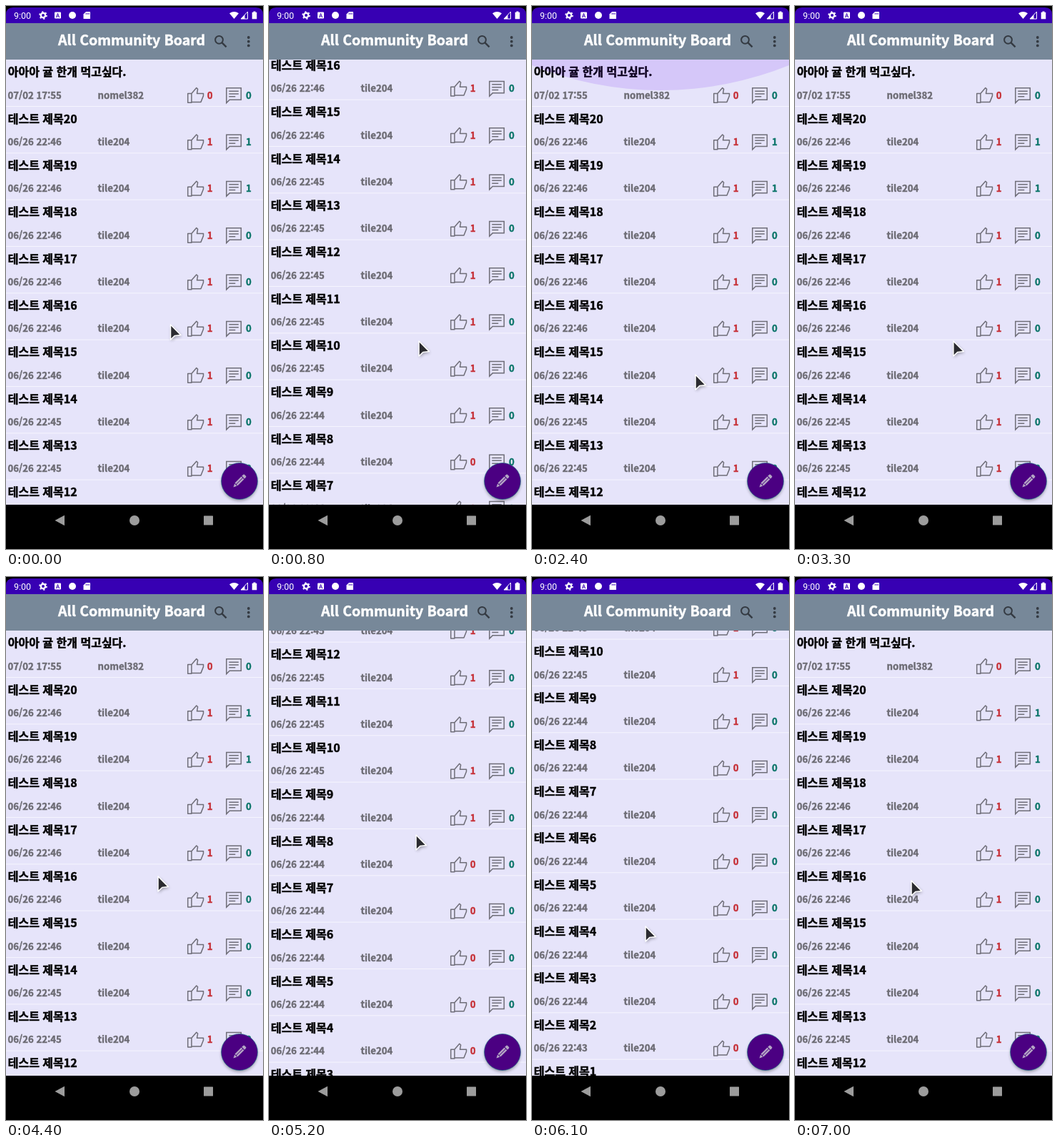
Write an HTML page that moves like this. It is 360x760 px and loops after 7100 ms.

```html
<!DOCTYPE html>
<html lang="ko">
<head>
<meta charset="utf-8">
<title>Community board</title>
<style>
  html, body { margin: 0; width: 100%; height: 100%; overflow: hidden; background: #000; }
  svg { display: block; }
  text { font-family: "Noto Sans CJK KR", "Noto Sans CJK", "Noto Sans", sans-serif; font-weight: 700; }
  .head { font-size: 19.5px; fill: #fff; stroke: #fff; stroke-width: .5; }
  .title { font-size: 16px; font-weight: 900; fill: #000; stroke: #000; stroke-width: .45; }
  .meta, .like, .reply { font-size: 13.2px; stroke-width: .4; }
  .meta { fill: #6c6b73; stroke: #6c6b73; }
  .like { fill: #c62f36; stroke: #c62f36; }
  .reply { fill: #0a7468; stroke: #0a7468; }
  .clock { font: 400 12.5px Roboto, sans-serif; fill: #fff; }
</style>
</head>
<body>
<svg width="360" height="760" viewBox="0 0 360 760">
  <defs>
    <clipPath id="view"><rect y="75" width="360" height="623"/></clipPath>
    <filter id="soft" x="-50%" y="-50%" width="200%" height="200%"><feGaussianBlur stdDeviation="2.2"/></filter>
    <g id="icons" fill="none" stroke="#6f6e78" stroke-width="1.5" stroke-linejoin="round">
      <path d="M254.7 47.5h5.2v12.8h-5.2zM259.9 47.5 266.8 39.6 268.6 41.4 267.5 47.5H276.5V50.6L273 59.4H259.9"/>
      <path d="M308.8 39.8H329.3V56.2H313.2L308.8 60.6zM312.3 44.2H325.8M312.3 48H325.8M312.3 51.8H321.3" stroke-linejoin="miter"/>
    </g>
  </defs>

  <rect width="360" height="760"/>
  <rect y="75" width="360" height="623" fill="#e6e4fa"/>
  <g clip-path="url(#view)">
    <g id="list"></g>
    <circle id="topGlow" cx="180" r="480" fill="#6200ee"/>
    <circle id="endGlow" cx="180" r="480" fill="#6200ee"/>
  </g>

  <path d="M0 24V12Q0 2 10 2H350Q360 2 360 12V24z" fill="#3700b3"/>
  <g fill="#fff">
    <text class="clock" x="11" y="17.5">9:00</text>
    <circle cx="52" cy="13" r="3.2" fill="none" stroke="#fff" stroke-width="2.4"/>
    <circle cx="52" cy="13" r="5" fill="none" stroke="#fff" stroke-width="1.6" stroke-dasharray="2.2 3.04"/>
    <rect x="68" y="8.5" width="9" height="9" rx="1"/>
    <path d="M70.4 16 72.5 10.4 74.6 16M71.2 14.2h2.6" fill="none" stroke="#3700b3"/>
    <circle cx="93" cy="13" r="5"/>
    <path d="M112 8h5.4q.6 0 .6.6v8.8q0 .6-.6.6h-8.3q-.6 0-.6-.6V11.5z"/>
    <path d="M112.2 9.8v2m2-2v2m2-2v2" stroke="#3700b3"/>
    <path d="M313 10.2Q319.5 5.6 326 10.2L319.5 18z"/>
    <path d="M338.5 8v10H329z" fill="none" stroke="#fff"/>
    <path d="M334.5 12.2V18H329z"/>
    <path d="M346.5 7.5h3v1.2h1.8v9.5h-6.6V8.7h1.8z"/>
  </g>

  <rect y="24" width="360" height="51" fill="#778899"/>
  <text class="head" x="73" y="55">All Community Board</text>
  <g fill="none" stroke="#343a42" stroke-width="2">
    <circle cx="298.5" cy="47.3" r="5.4"/>
    <path d="M302.6 51.4 308.6 57.4" stroke-width="2.4"/>
  </g>
  <g fill="#343a42">
    <circle cx="339.8" cy="44" r="1.9"/><circle cx="339.8" cy="49.7" r="1.9"/><circle cx="339.8" cy="55.4" r="1.9"/>
  </g>

  <circle cx="327" cy="667.5" r="25" fill="#000" opacity=".35" filter="url(#soft)"/>
  <circle cx="327" cy="665" r="25.5" fill="#4b0082" stroke="#187b86" stroke-width=".6"/>
  <g transform="translate(327 665) rotate(45)" fill="#b3a5c4">
    <path d="M-2.7-6.4H-.4V6.4H-2.7zM.4-6.4H2.7V6.4H.4zM-2.4 7.3H2.4L0 12zM-2.7-7.4V-10q0-1.4 1.4-1.4h2.6q1.4 0 1.4 1.4v2.6z"/>
  </g>

  <rect y="698" width="360" height="62"/>
  <g fill="#9c9c9c">
    <path d="M68.5 720 82 712.8V727.2z"/>
    <circle cx="180" cy="720" r="7"/>
    <rect x="277" y="713.5" width="13" height="13" rx=".6"/>
  </g>

  <g id="pointer">
    <path d="M0 0V21L6 15.4 14.5 14.6z" transform="translate(1 2)" opacity=".35" filter="url(#soft)"/>
    <path d="M0 0V21L6 15.4 14.5 14.6z" fill="#2b2b30" stroke="#fff" stroke-width="1.5" stroke-linejoin="round"/>
  </g>
</svg>
<script>
  const LOOP = 7100, STEP = 100, PITCH = 65.333, GLOW_R = 480;
  const $ = id => document.getElementById(id);

  function minute(n) {
    return n > 14 ? 46 : n > 9 ? 45 : n > 2 ? 44 : 43;
  }

  function row(i) {
    const n = 21 - i, first = i === 0;
    const title = first ? "아아아 귤 한개 먹고싶다." : "테스트 제목" + n;
    const date = first ? "07/02 17:55" : "06/26 22:" + minute(n);
    const user = first ? "nomel382" : "tile204";
    const likes = !first && n > 8 ? 1 : 0;
    const replies = !first && n > 18 ? 1 : 0;
    return `<g transform="translate(0 ${75 + i * PITCH})">
      <text class="title" x="2.7" y="23.2">${title}</text>
      <text class="meta" x="2.5" y="54.6">${date}</text>
      <text class="meta" x="128.5" y="54.6">${user}</text>
      <use href="#icons"/>
      <text class="like" x="281.8" y="54.6">${likes}</text>
      <text class="reply" x="336" y="54.6">${replies}</text>
      <rect y="65" width="360" height="1" fill="#f6f5fe"/>
    </g>`;
  }
  $("list").innerHTML = Array.from({ length: 21 }, (_, i) => row(i)).join("");

  const ease = {
    line: p => p,
    out: p => 1 - (1 - p) ** 2.4,
    both: p => p * p * (3 - 2 * p)
  };

  // Each key is [time, value, ...]; the curve leads into the key.
  function at(keys, t, curve, col = 1) {
    const k = keys.findIndex(key => key[0] > t);
    if (k < 0) return keys[keys.length - 1][col];
    if (k === 0) return keys[0][col];
    const a = keys[k - 1], b = keys[k];
    const p = (t - a[0]) / (b[0] - a[0]);
    return a[col] + (b[col] - a[col]) * curve(p);
  }

  const scroll = [
    [100, 0, "line"], [800, 336, "out"], [900, 352, "line"], [1500, 749, "out"],
    [2000, 749, "line"], [2350, 0, "both"], [4500, 0, "line"], [5200, 572, "both"],
    [5700, 749, "out"], [6000, 749, "line"], [6100, 706.7, "line"], [6600, 0, "out"]
  ];
  function scrollAt(t) {
    const next = scroll.find(key => key[0] > t);
    return at(scroll, t, ease[next ? next[2] : "line"]);
  }

  const path = [
    [0, 230.5, 446], [350, 222, 372], [800, 210, 469], [1200, 214, 378], [1700, 222, 400],
    [2000, 226, 420], [2400, 229, 516], [2800, 228, 510], [3600, 219, 450], [4400, 213, 419],
    [4700, 212, 440], [5200, 206, 361], [5800, 170, 410], [6100, 159, 489],
    [6400, 160, 500], [7000, 163, 425]
  ];
  const topGlow = [[2200, 0], [2400, 43], [2600, 40], [3100, 0]];
  const endGlow = [[1400, 0], [1500, 32], [1800, 0]];

  function setGlow(id, depth, y) {
    $(id).setAttribute("cy", y);
    $(id).setAttribute("opacity", 0.13 * Math.min(1, depth / 40));
  }

  function draw(t) {
    $("list").setAttribute("transform", `translate(0 ${-scrollAt(t)})`);
    const x = at(path, t, ease.both, 1), y = at(path, t, ease.both, 2);
    $("pointer").setAttribute("transform", `translate(${x} ${y})`);
    const top = at(topGlow, t, ease.line), end = at(endGlow, t, ease.line);
    setGlow("topGlow", top, 75 + top - GLOW_R);
    setGlow("endGlow", end, 698 - end + GLOW_R);
  }

  const start = performance.now();
  function tick() {
    const t = (performance.now() - start) % LOOP;
    draw(Math.floor(t / STEP) * STEP);
    requestAnimationFrame(tick);
  }
  tick();
</script>
</body>
</html>
```
